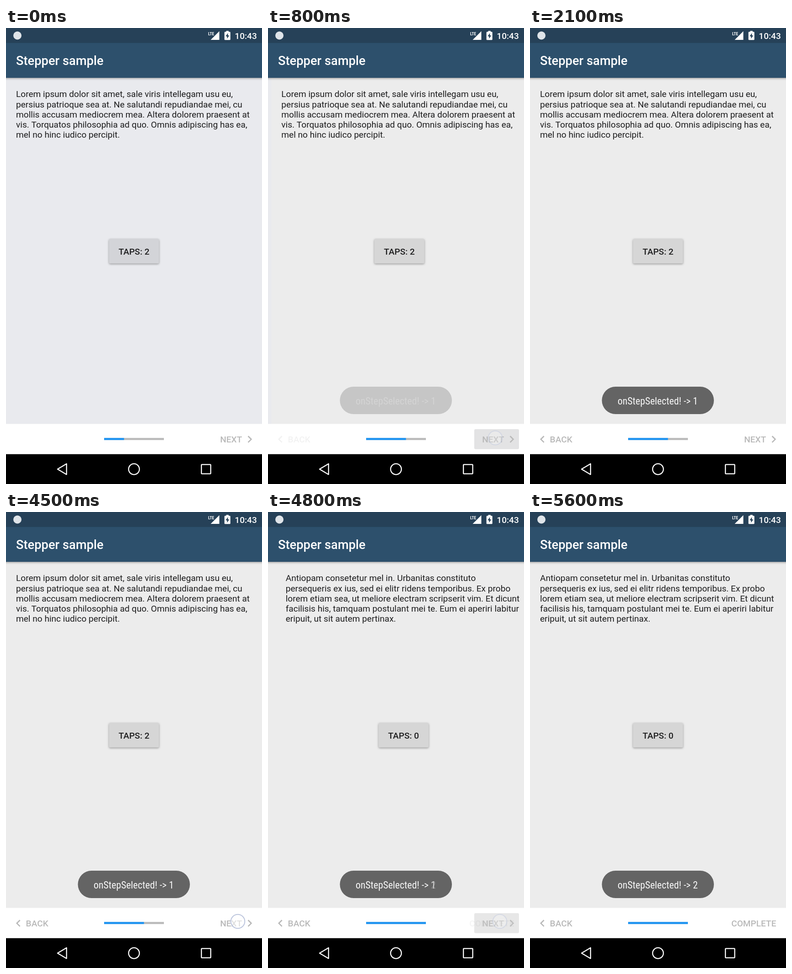
These frames come from a looping animation (561x998 px, 8 s). An HTML page with a canvas:

```html
<!DOCTYPE html>
<html lang="en">
<head>
<meta charset="utf-8">
<title>Stepper</title>
<style>
  html, body { margin: 0; width: 100%; height: 100%; overflow: hidden; background: #000; }
  canvas { display: block; }
</style>
</head>
<body>
<canvas id="stage" width="561" height="998"></canvas>
<script>
const W = 561, H = 998, LOOP = 8000;
const ctx = document.getElementById('stage').getContext('2d');
const SANS = 'Roboto, sans-serif';
const NARROW = '"Roboto Condensed", Roboto, sans-serif';
const BODY = 19.1;
const BLUE = '#2196f3';
const LABEL = '#b9b9b9';

const LOREM = [
  'Lorem ipsum dolor sit amet, sale viris intellegam usu eu,',
  'persius patrioque sea at. Ne salutandi repudiandae mei, cu',
  'mollis accusam mediocrem mea. Altera dolorem praesent at',
  'vis. Torquatos philosophia ad quo. Omnis adipiscing has ea,',
  'mel no hinc iudico percipit.'
];
const ANTIOPAM = [
  'Antiopam consetetur mel in. Urbanitas constituto',
  'persequeris ex ius, sed ei elitr ridens temporibus. Ex probo',
  'lorem etiam sea, ut meliore electram scripserit vim. Et dicunt',
  'facilisis his, tamquam postulant mei te. Eum ei aperiri labitur',
  'eripuit, ut sit autem pertinax.'
];
const PAGES = [
  { lines: LOREM, taps: 2, bg: '#e9eaee' },
  { lines: LOREM, taps: 2, bg: '#ececec' },
  { lines: ANTIOPAM, taps: 0, bg: '#ececec' }
];

// Each tap: finger down, then the step change
const TAPS = [
  { down: 500, step: 685, x: 498, y: 897 },
  { down: 4500, step: 4700, x: 508, y: 896 }
];

const clamp = v => Math.min(1, Math.max(0, v));
const quint = u => 1 - (1 - u) ** 5;
const smooth = u => (1 - Math.cos(Math.PI * u)) / 2;
const decel = u => 1 - (1 - u) ** 2;

// Piecewise linear curve through [time, value] points
function curve(t, points) {
  if (t <= points[0][0]) return points[0][1];
  for (let i = 1; i < points.length; i++) {
    const [a, from] = points[i - 1], [b, to] = points[i];
    if (t < b) return from + (to - from) * (t - a) / (b - a);
  }
  return points[points.length - 1][1];
}

const toastFade = u => curve(u, [[0, 0], [115, 0.28], [415, 0.66], [620, 1]]);
const pressFade = u => curve(u, [[70, 0], [200, 0.11], [300, 0.11], [600, 0.075], [800, 0]]);
const fingerFade = u => u < 0 ? 0 : curve(u, [[0, 1], [150, 1], [420, 0]]);

function text(str, x, y, size, color, weight = 400, align = 'left') {
  ctx.font = `${weight} ${size}px ${SANS}`;
  ctx.textAlign = align;
  ctx.fillStyle = color;
  ctx.fillText(str, x, y);
}

function rect(x, y, w, h, color) {
  ctx.fillStyle = color;
  ctx.fillRect(x, y, w, h);
}

function round(x, y, w, h, r, color) {
  ctx.beginPath();
  ctx.roundRect(x, y, w, h, r);
  ctx.fillStyle = color;
  ctx.fill();
}

function path(points, close) {
  ctx.beginPath();
  points.forEach(([x, y]) => ctx.lineTo(x, y));
  if (close) ctx.closePath();
}

function stroke(color, width) {
  ctx.strokeStyle = color;
  ctx.lineWidth = width;
  ctx.stroke();
}

function fade(alpha, draw) {
  if (alpha <= 0) return;
  ctx.save();
  ctx.globalAlpha = alpha;
  draw();
  ctx.restore();
}

// Narrow font sized so that the sample string takes the given width
function narrowFont(sample, width, weight) {
  const at = size => `${weight} condensed ${size}px ${NARROW}`;
  ctx.font = at(100);
  return at(100 * width / ctx.measureText(sample).width);
}

function drawPage(page, x) {
  ctx.save();
  ctx.translate(x, 0);
  rect(0, 109, W + 1, 758, page.bg);
  page.lines.forEach((line, i) => text(line, 22, 151.3 + i * 22.25, BODY, '#1d1d1e'));
  ctx.save();
  ctx.shadowColor = 'rgba(0,0,0,0.36)';
  ctx.shadowBlur = 4;
  ctx.shadowOffsetY = 1.5;
  round(225.7, 461.5, 109.6, 53.8, 2.7, page.bg);
  ctx.restore();
  round(225.7, 461.5, 109.6, 53.8, 2.7, 'rgba(0,0,0,0.093)');
  text('TAPS: ' + page.taps, 280.5, 495.6, BODY, '#1d1d1e', 500, 'center');
  ctx.restore();
}

function drawPages(t) {
  const pos = TAPS.reduce((sum, tap) => sum + quint(clamp((t - tap.step) / 200)), 0);
  PAGES.forEach((page, i) => {
    const x = (i - pos) * W;
    if (Math.abs(x) < W) drawPage(page, x);
  });
}

function drawHeader() {
  const shade = ctx.createLinearGradient(0, 109, 0, 115);
  shade.addColorStop(0, 'rgba(0,0,0,0.3)');
  shade.addColorStop(0.4, 'rgba(0,0,0,0.1)');
  shade.addColorStop(1, 'rgba(0,0,0,0)');
  rect(0, 109, W, 6, shade);
  rect(0, 0, W, 109, '#2d506c');
  rect(0, 0, W, 32.7, '#264158');
  text('Stepper sample', 22, 81, 27.3, '#fff', 500);

  ctx.beginPath();
  ctx.arc(25, 16.5, 9, 0, 7);
  ctx.fillStyle = '#dfe4e9';
  ctx.fill();

  ctx.font = narrowFont('LTE', 13, 700);
  ctx.fillStyle = '#fff';
  ctx.textAlign = 'left';
  ctx.fillText('LTE', 443, 16);
  path([[467.5, 7], [467.5, 26], [448.5, 26]], true);
  ctx.fill();
  round(478.7, 8.3, 13, 18, 1.5, '#fff');
  rect(482.5, 6.3, 5.4, 3, '#fff');
  path([[486.3, 11], [481.3, 18.2], [484.4, 18.2], [484.4, 23.5], [489.3, 16.2], [486.3, 16.2]], true);
  ctx.fillStyle = '#264158';
  ctx.fill();
  text('10:43', 501.3, 23.7, BODY, '#fff', 500);
}

function drawToast(t) {
  const [first, second] = TAPS.map(tap => toastFade(t - tap.step));
  const label = 'onStepSelected! -> ';
  fade(first, () => {
    round(157.5, 785, 245.5, 60, 30, '#646464');
    ctx.font = narrowFont(label + '1', 176, 400);
    ctx.textAlign = 'left';
    ctx.fillStyle = '#f7f7f7';
    ctx.fillText(label, 192, 824);
    const x = 192 + ctx.measureText(label).width;
    fade(first * (1 - second), () => ctx.fillText('1', x, 824));
    fade(first * second, () => ctx.fillText('2', x, 824));
  });
}

function chevron(x, dir) {
  path([[x, 893.3], [x + 6.8 * dir, 900.1], [x, 906.9]]);
  stroke(LABEL, 2.7);
}

function drawFooter(t) {
  rect(0, 866.5, W, 67, '#fff');

  const [back, done] = TAPS.map(tap => smooth(clamp((t - tap.step) / 400)));
  fade(back, () => {
    chevron(30.6, -1);
    text('BACK', 43.6, 907, BODY, LABEL, 500);
  });
  fade(done, () => text('COMPLETE', 539.5, 907, BODY, LABEL, 500, 'right'));
  fade(1 - done, () => {
    const press = Math.max(...TAPS.map(tap => pressFade(t - tap.down)));
    round(452, 878, 98, 43.7, 2.7, `rgba(0,0,10,${press})`);
    text('NEXT', 517.3, 907, BODY, LABEL, 500, 'right');
    chevron(530.6, 1);
  });

  const steps = TAPS.reduce((sum, tap) => sum + decel(clamp((t - tap.step) / 100)), 1);
  rect(215, 897.2, 131, 4.6, '#bababa');
  rect(215, 897.2, 131 * steps / 3, 4.6, BLUE);
}

function drawNav() {
  rect(0, 932.7, W, H - 932.7, '#000');
  ctx.lineJoin = 'round';
  path([[113, 965.5], [132.7, 953.8], [132.7, 977.2]], true);
  stroke('#fff', 2.3);
  ctx.beginPath();
  ctx.arc(280.5, 965.5, 11.8, 0, 7);
  stroke('#fff', 2.3);
  ctx.beginPath();
  ctx.roundRect(428.2, 955.3, 20.4, 20.4, 1);
  stroke('#fff', 2.3);
  ctx.lineJoin = 'miter';
}

function drawFinger(t) {
  TAPS.forEach(({ down, x, y }) => fade(fingerFade(t - down), () => {
    ctx.beginPath();
    ctx.arc(x, y, 15.3, 0, 7);
    ctx.fillStyle = 'rgba(255,255,255,0.55)';
    ctx.fill();
    stroke('#bcc5dd', 2);
  }));
}

function frame(now) {
  const t = now % LOOP;
  drawPages(t);
  drawHeader();
  drawToast(t);
  drawFooter(t);
  drawNav();
  drawFinger(t);
  requestAnimationFrame(frame);
}
requestAnimationFrame(frame);
</script>
</body>
</html>
```
